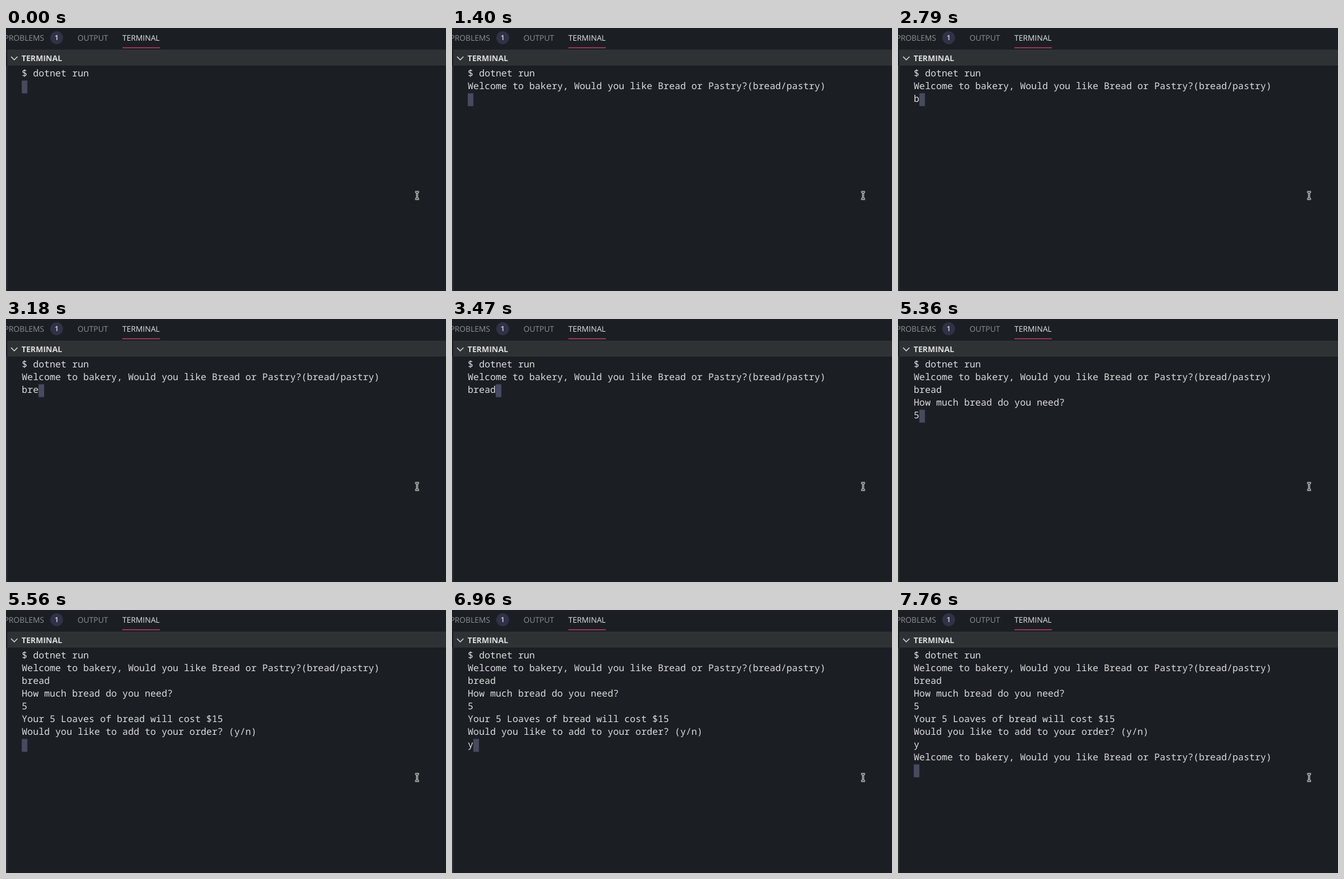
Recreate the animation shown at these times as an HTML page with a canvas. Size 692 by 413 pixels, loop 8 s.

```html
<!DOCTYPE html>
<html lang="en">
<head>
<meta charset="utf-8">
<title>Terminal session</title>
<style>
  html, body { margin: 0; width: 100%; height: 100%; overflow: hidden; background: #1b1e23; }
  canvas { display: block; }
</style>
</head>
<body>
<canvas id="stage"></canvas>
<script>
const W = 692, H = 413, LOOP = 8000;
const ROW = 20, CELL = 8.797, LEFT = 24.8, TOP = 62;
const UI = '"Open Sans", "Noto Sans", sans-serif';
const MONO = '500 14.66px "Noto Sans Mono", "DejaVu Sans Mono", monospace';

const canvas = document.getElementById('stage');
const ctx = canvas.getContext('2d');
const scale = window.devicePixelRatio || 1;
canvas.width = W * scale;
canvas.height = H * scale;
canvas.style.width = W + 'px';
canvas.style.height = H + 'px';

const WELCOME = 'Welcome to bakery, Would you like Bread or Pastry?(bread/pastry)\n';

// Each event appends its text to the terminal at the given time.
const events = [
  [0, '$ dotnet run\n'],
  [1400, WELCOME],
  [2790, 'b'],
  [2990, 'r'],
  [3180, 'e'],
  [3280, 'a'],
  [3470, 'd'],
  [3670, '\nHow much bread do you need?\n'],
  [5360, '5'],
  [5560, '\nYour 5 Loaves of bread will cost $15\nWould you like to add to your order? (y/n)\n'],
  [6960, 'y'],
  [7760, '\n' + WELCOME]
];

function rect(x, y, w, h, color) {
  ctx.fillStyle = color;
  ctx.fillRect(x, y, w, h);
}

function label(text, x, y, font, color, align = 'left') {
  ctx.font = font;
  ctx.fillStyle = color;
  ctx.textAlign = align;
  ctx.fillText(text, x, y);
}

function polyline(points, color, width) {
  ctx.beginPath();
  points.forEach(([x, y], i) => i ? ctx.lineTo(x, y) : ctx.moveTo(x, y));
  ctx.strokeStyle = color;
  ctx.lineWidth = width;
  ctx.stroke();
}

function drawPanel() {
  rect(0, 0, W, H, '#1b1e23');

  const tab = '500 12.2px ' + UI;
  label('PROBLEMS', 60, 19.5, tab, '#8f9194', 'right');
  label('OUTPUT', 112.5, 19.5, tab, '#8f9194');
  label('TERMINAL', 183, 19.5, tab, '#e4e5e6');
  rect(183, 30, 59, 2, '#8a3650');

  ctx.beginPath();
  ctx.arc(79.7, 15.3, 10.2, 0, Math.PI * 2);
  ctx.fillStyle = '#303247';
  ctx.fill();
  label('1', 79.7, 19.4, '600 11px ' + UI, '#e2e2ea', 'center');

  rect(2, 34, W - 2, 25, '#2f3235');
  rect(0, 59, 2, H - 59, '#2d3034');
  polyline([[8, 45], [13, 50], [18, 45]], '#d6d7d8', 1.4);
  label('TERMINAL', 24.5, 52, 'bold 12.4px ' + UI, '#dcddde');
}

function drawTerminal(t) {
  const text = events.filter(e => e[0] <= t).map(e => e[1]).join('');
  const lines = text.split('\n');
  const last = lines.length - 1;
  rect(LEFT + lines[last].length * CELL, TOP + 0.5 + last * ROW, CELL, 20.2, '#484a60');
  lines.forEach((line, i) => label(line, LEFT, TOP + 14 + i * ROW, MONO, '#dcdddd'));
}

function drawPointer(x, y) {
  const bar = dy => [[x - 3, y + dy], [x + 3, y + dy]];
  const strokes = [bar(-5.5), [[x, y - 5.5], [x, y + 5.5]], bar(5.5)];
  for (const s of strokes) polyline(s, '#f2f2f2', 3);
  for (const s of strokes) polyline(s, '#101215', 1);
}

function frame(now) {
  ctx.setTransform(scale, 0, 0, scale, 0, 0);
  ctx.textBaseline = 'alphabetic';
  ctx.textRendering = 'geometricPrecision';
  drawPanel();
  drawTerminal(now % LOOP);
  drawPointer(646.5, 263);
  requestAnimationFrame(frame);
}

frame(performance.now());
</script>
</body>
</html>
```
